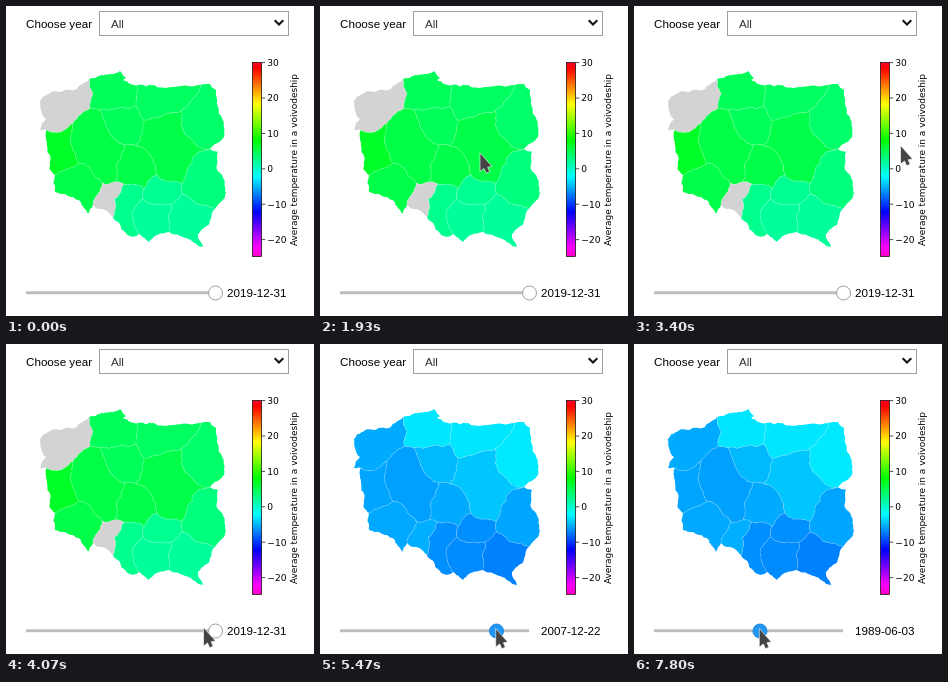
An HTML page for the animation above (8000 ms loop, 308 by 310 pixels).

```html
<!DOCTYPE html>
<html lang="en">
<head>
<meta charset="utf-8">
<title>Average temperature map</title>
<style>
  html, body { margin: 0; width: 100%; height: 100%; overflow: hidden; background: #fff; }
  svg { display: block; width: 308px; height: 310px; }
  .ui { font: 11.65px "Liberation Sans", Arial, sans-serif; }
  .plot { font: 9.1px "DejaVu Sans", sans-serif; }
  .label { font-size: 8.97px; text-anchor: middle; }
  .borders path { fill: none; stroke: #fff; stroke-opacity: .24; stroke-width: .8; stroke-linejoin: round; }
</style>
</head>
<body>
<svg viewBox="0 0 308 310">
  <defs>
    <linearGradient id="scale" x1="0" y1="0" x2="0" y2="1">
      <stop offset="0" stop-color="#ff0029"/>
      <stop offset=".03" stop-color="#f00"/>
      <stop offset=".215" stop-color="#ff0"/>
      <stop offset=".4" stop-color="#0f0"/>
      <stop offset=".586" stop-color="#0ff"/>
      <stop offset=".77" stop-color="#00f"/>
      <stop offset=".954" stop-color="#f0f"/>
      <stop offset="1" stop-color="#ff00bf"/>
    </linearGradient>
  </defs>

  <g class="ui">
    <text x="20" y="22">Choose year</text>
    <rect x="93.5" y="5.5" width="189" height="24" fill="#fff" stroke="#9e9e9e"/>
    <text x="105" y="22" fill="#333">All</text>
    <path d="M268.7 14.2l4.3 4.3 4.3-4.3" fill="none" stroke="#111" stroke-width="2"/>
  </g>

  <g id="areas"></g>
  <g id="borders" class="borders"></g>

  <g id="bar" class="plot">
    <rect x="246.5" y="56.5" width="9" height="194" fill="url(#scale)" stroke="#000" stroke-width=".7"/>
    <text class="label" transform="translate(290.5 154) rotate(-90)">Average temperature in a voivodeship</text>
  </g>

  <rect x="20" y="285.3" width="189" height="2.9" fill="#bdbdbd"/>
  <circle id="knob" cy="287" r="7"/>
  <text id="date" class="ui" x="221" y="291"></text>

  <path id="cursor" d="M0 0V18.6L4 15.4 6.2 20.2 9.6 18.7 7.7 14.2 12 13.4Z"
        fill="#444" stroke="#fff" stroke-opacity=".75" stroke-width=".8"/>
</svg>

<script>
const LOOP = 8000, STEP = 1000 / 15;
const $ = id => document.getElementById(id);

function add(parent, tag, attrs, text) {
  const el = document.createElementNS('http://www.w3.org/2000/svg', tag);
  for (const k in attrs) el.setAttribute(k, attrs[k]);
  if (text) el.textContent = text;
  return parent.appendChild(el);
}

// Colour bar ticks
for (let v = 30; v >= -20; v -= 10) {
  const y = 56.6 + (30 - v) * 3.54;
  add($('bar'), 'path', { d: `M256 ${y}h3.2`, stroke: '#000', 'stroke-width': .7 });
  add($('bar'), 'text', { x: 261.3, y: y + 3.4 }, String(v).replace('-', '\u2212'));
}

// Points where borders meet: capitals on the outline, the rest inside
const nodes = {
  A: [41, 124], B: [83, 73], C: [132, 79], D: [194, 79], E: [204, 143], F: [209, 203],
  G: [163, 226], H: [133, 228], I: [107, 211], J: [87, 199], K: [49, 169],
  a: [84, 102], b: [94, 104], c: [130, 100], d: [138, 114], e: [175, 105], f: [130, 140],
  g: [119, 139], h: [109, 176], i: [118, 178], j: [96, 177], k: [73, 157], l: [67, 117],
  m: [151, 169], n: [138, 183], o: [137, 193], p: [165, 198], q: [177, 188], r: [176, 178]
};

// Outline: the area, then its points clockwise
const outer = `
zp A 34,124 40,113 34,95 71,83 B
po B 95,69 114,65 120,72 117,74 C
wm C 148,79 D
pd D 204,78 210,84 218,131 E
lb E 212,146 212,165 220,187 F
pk F 192,228 197,241 180,232 G
ml G 149,230 143,236 H
sl H 126,231 I
op I 94,203 J
ds J 82,208 74,195 49,186 K
ls K 44,164 41,140 A`;

// Inner borders: two areas, two nodes, sideways bend
const inner = `
zp.po B a 0
zp.wl a l 0
zp.ls l A -3
po.wl a b 0
po.kp b c -2
po.wm C c 2
kp.wm c d 0
wm.mz d e 0
wm.pd e D 6
mz.pd e E 5
kp.mz d f 0
kp.ld f g 0
kp.wl g b -8
ls.wl l k 6
ls.ds k K 0
wl.ds k j -4
wl.op j h 1
wl.ld h g 2
op.ld h i 0
op.sl i I 0
ds.op j J 0
ld.mz f m -7
ld.sw m n 0
ld.sl n i 1
sw.sl n o 0
sl.ml o H 7
sw.ml o p 4
ml.pk p G 0
sw.pk p q 0
pk.lb q F 2
sw.lb r q 0
mz.sw m r 2
mz.lb r E -10`;

// Mean temperature of each area in both views; null has no data
const temps = {
  zp: [null, -5.6], po: [4.5, -3.2], wm: [4.2, -3.2], pd: [3.8, -3.1],
  kp: [4.5, -5], mz: [5.1, -4.5], wl: [5.2, -6], ls: [6.4, -5.8],
  ld: [5.1, -5.6], ds: [5.1, -5.7], op: [null, -5.4], sl: [2.4, -6.7],
  sw: [2.2, -6.7], ml: [1.8, -6.8], pk: [1.8, -7.2], lb: [3, -5.8]
};

// Green at 8 degrees, cyan at -2.2, blue at -12.4
function heat(t) {
  if (t === null) return '#d3d3d3';
  const part = v => Math.round(255 * Math.max(0, Math.min(1, v / 10.2)));
  return `rgb(0 ${part(t + 12.4)} ${part(8 - t)})`;
}

let seed = 7;
const rand = () => (seed = seed * 16807 % 2147483647) / 2147483647 - .5;

// Split a line at shifted midpoints for a bent, ragged edge
function rough(p, q, bend = 0) {
  const dx = q[0] - p[0], dy = q[1] - p[1], len = Math.hypot(dx, dy);
  if (len < 3) return [q];
  const s = bend / len + rand() * .26;
  const mid = [(p[0] + q[0]) / 2 - dy * s, (p[1] + q[1]) / 2 + dx * s];
  return [...rough(p, mid, bend / 4), ...rough(mid, q, bend / 4)];
}

function coast(line) {
  const [area, ...words] = line.split(' ');
  const pts = words.map(w => nodes[w] || w.split(',').map(Number));
  const path = pts.flatMap((p, n) => n ? rough(pts[n - 1], p) : [p]);
  return { areas: [area], path };
}

function border(line) {
  const [areas, from, to, bend] = line.split(' ');
  const p = nodes[from];
  return { areas: areas.split('.'), path: [p, ...rough(p, nodes[to], +bend)] };
}

const lines = text => text.trim().split('\n');
const toPath = pts => 'M' + pts.map(p => p.map(v => v.toFixed(1)).join(' ')).join('L');
const borders = lines(inner).map(border);
const arcs = [...lines(outer).map(coast), ...borders];

// Join the arcs of one area end to end
function ring(name) {
  const rest = arcs.filter(a => a.areas.includes(name)).map(a => a.path);
  const pts = [...rest.shift()];
  while (rest.length) {
    const end = pts[pts.length - 1];
    const n = rest.findIndex(p => p[0] === end || p[p.length - 1] === end);
    if (n < 0) break;
    const next = rest.splice(n, 1)[0];
    pts.push(...(next[0] === end ? next : [...next].reverse()).slice(1));
  }
  return toPath(pts) + 'Z';
}

const areas = Object.keys(temps).map(name =>
  ({ el: add($('areas'), 'path', { d: ring(name) }), fill: temps[name].map(heat) }));
for (const b of borders) add($('borders'), 'path', { d: toPath(b.path) });

// Pointer: time, x, y
const moves = [
  [667, 312, 213], [1200, 176, 225],
  [1600, 176, 225], [1933, 160, 147], [2067, 165, 166],
  [2467, 165, 166], [2733, 260, 135],
  [2800, 260, 135], [3133, 258, 66], [3667, 275, 213],
  [4067, 197.5, 283.5], [4400, 175.7, 284.5],
  [6667, 175.7, 284.5], [7333, 125.3, 284.5]
];

// Slider: time, knob x, date
const slides = [
  [0, 209.5, '2019-12-31'],
  [4933, 176.5, '2007-12-22'],
  [7800, 126, '1989-06-03']
];

function pointerAt(t) {
  const n = moves.findIndex(m => m[0] > t);
  if (n < 0) return moves[moves.length - 1].slice(1);
  if (n === 0) return moves[0].slice(1);
  const [t0, x0, y0] = moves[n - 1], [t1, x1, y1] = moves[n];
  const u = (t - t0) / (t1 - t0), k = u * u * (3 - 2 * u);
  return [x0 + (x1 - x0) * k, y0 + (y1 - y0) * k];
}

function draw(ms) {
  const t = Math.floor((ms % LOOP + 5) / STEP) * STEP;

  const [x, y] = pointerAt(t);
  $('cursor').setAttribute('transform', `translate(${x} ${y})`);
  $('cursor').style.display = t < 730 ? 'none' : '';

  const [since, knobX, date] = slides.filter(s => s[0] <= t + 1).pop();
  const knob = $('knob');
  knob.setAttribute('cx', knobX);
  knob.setAttribute('fill', since ? '#2196f3' : '#fff');
  knob.setAttribute('stroke', since ? '#1e88e5' : '#9e9e9e');
  $('date').textContent = date;

  const view = t < 5460 ? 0 : 1;
  for (const a of areas) a.el.setAttribute('fill', a.fill[view]);
}

const start = performance.now();
function tick() {
  draw(performance.now() - start);
  requestAnimationFrame(tick);
}
tick();
</script>
</body>
</html>
```
